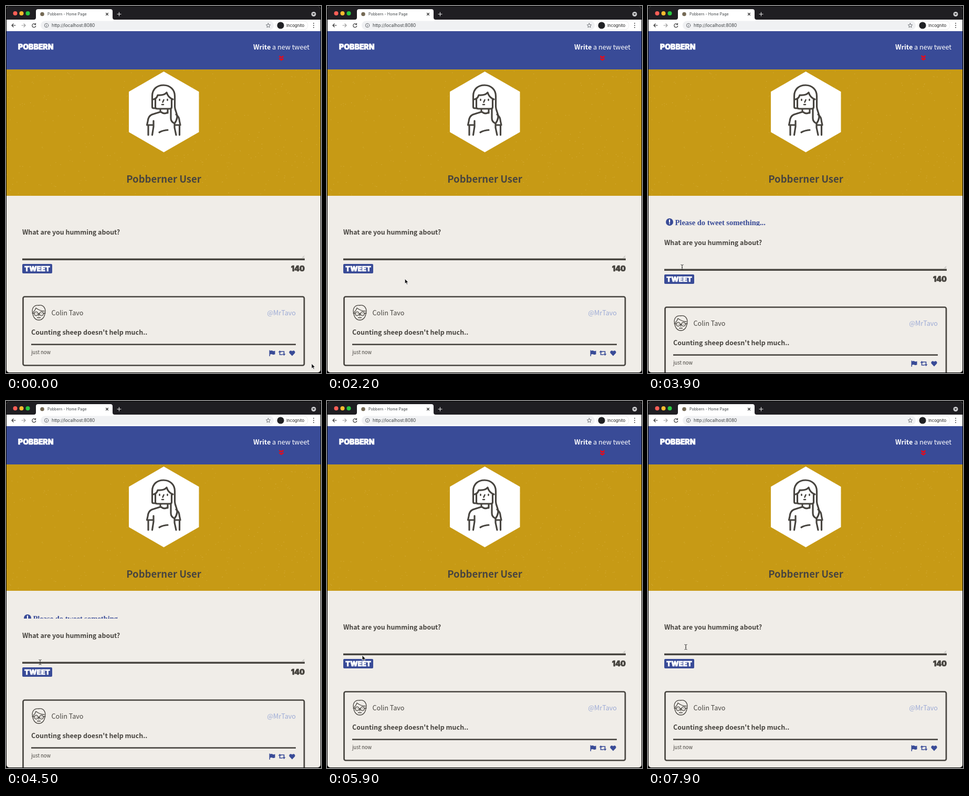
Write an HTML page that moves like this. It is 600 by 700 pixels and loops after 8 s.

```html
<!DOCTYPE html>
<html lang="en">
<head>
<meta charset="utf-8">
<title>Pobbern - Home Page</title>
<style>
html, body { margin: 0; width: 100%; height: 100%; overflow: hidden; background: #000; }
svg { display: block; width: 600px; height: 700px; }
text { font: 300 12.6px "Noto Sans CJK JP", "Noto Sans CJK SC", "Noto Sans", sans-serif; fill: #47443f; white-space: pre; }
.bold { font-weight: 700; }
.end { text-anchor: end; }
.ui { font: 400 7.1px Inter, Roboto, sans-serif; fill: #3c4043; }
.block { font: 900 14px Inter, Roboto, sans-serif; stroke-width: .7; }
.light { fill: #fff; }
.blue { fill: #394b97; }
.ink { fill: none; stroke: #47443f; stroke-linecap: round; stroke-linejoin: round; }
.icon { fill: none; stroke: #5f6368; stroke-width: 1.2; stroke-linecap: round; stroke-linejoin: round; }
</style>
</head>
<body>
<svg viewBox="0 0 600 700">
<defs>
  <clipPath id="window"><rect x="1" y="1" width="598" height="698" rx="5"/></clipPath>
  <clipPath id="reveal"><rect id="revealBox" x="28" y="380" width="300" height="0"/></clipPath>
</defs>
<g clip-path="url(#window)">
  <rect width="600" height="700" fill="#f0ede8"/>

  <!-- browser bar -->
  <rect width="600" height="27" fill="#1f1e22"/>
  <circle cx="17.5" cy="14" r="4" fill="#ff5f57"/>
  <circle cx="29.5" cy="14" r="4" fill="#febc2e"/>
  <circle cx="41.5" cy="14" r="4" fill="#28c840"/>
  <path d="M53 26Q57 26 57 22V10Q57 6 61 6H199Q203 6 203 10V22Q203 26 207 26V27H53Z" fill="#fff"/>
  <rect y="26" width="600" height="22" fill="#fff"/>
  <circle cx="69" cy="15.5" r="3.8" fill="#756a55"/>
  <text class="ui" x="79" y="18">Pobbern - Home Page</text>
  <path class="icon" d="M190.5 13.5l4 4m0-4l-4 4" style="stroke:#333"/>
  <path class="icon" d="M212 15.5h7m-3.500-3.500v7" style="stroke:#ddd"/>
  <circle cx="586" cy="15.500" r="4.500" fill="#c9c9cc"/>
  <path d="M583.500 14.300h5l-2.500 3z" fill="#222"/>
  <path class="icon" d="M18 37h-7m3-3l-3 3 3 3" style="stroke:#333"/>
  <path class="icon" d="M30 37h7m-3-3l3 3-3 3" style="stroke:#999"/>
  <path class="icon" d="M56 35a3.500 3.500 0 1 0 .7 3M56.500 33v2.500h-2.500" style="stroke:#444"/>
  <rect x="66" y="28.500" width="444" height="17" rx="8.500" fill="#f0f1f3"/>
  <circle class="icon" cx="77" cy="37" r="3.700" style="stroke-width:.9"/>
  <path class="icon" d="M77 36.800v2M77 35v.01" style="stroke-width:1"/>
  <text class="ui" x="87" y="40" style="font-size:8.3px">http://localhost:8080</text>
  <path class="icon" d="M499.500 33l1.200 2.700 2.900.3-2.200 2 .6 2.900-2.500-1.500-2.500 1.500.6-2.900-2.200-2 2.900-.3z" style="stroke-width:.9"/>
  <rect x="514" y="28.500" width="61" height="17" rx="8.500" fill="#fff" stroke="#e6e6e8" stroke-width=".8"/>
  <circle cx="523" cy="37" r="6.600" fill="#202124"/>
  <text class="ui" x="534" y="40" style="font-size:7.8px;fill:#222">Incognito</text>
  <path d="M586 33v.01m0 4v.01m0 4v.01" stroke="#444" stroke-width="1.900" stroke-linecap="round"/>

  <!-- header and banner -->
  <rect y="48" width="600" height="73" class="blue"/>
  <text class="block light" x="23" y="83" stroke="#fff">POBBERN</text>
  <text class="end light" x="578" y="83"><tspan class="bold">Write</tspan> a new tweet</text>
  <path id="arrow" d="M520.500 -3.700l4 3 4-3M520.500 1l4 3 4-3" fill="none" stroke="#f40612" stroke-width="2.300"/>
  <rect y="121" width="600" height="241" fill="#c79a15"/>
  <path id="specks" stroke="#e0bb55" stroke-width="1.100" stroke-linecap="round" opacity=".5"/>
  <path d="M300.500 125L367.500 163.500V240.500L300.500 279L234 240.500V163.500Z" fill="#fff"/>
  <g class="ink" stroke-width="3.200">
    <path d="M284 195H281Q278.500 195 278.500 192V172C278.500 158 288 151 300 151S321.500 159 321.500 172V192C322 201 326 203 326 212Q325 219 321 224Q314 221 314 214V197"/>
    <path d="M284.500 178V193Q284.500 196 288 196H312Q315.500 196 315.500 193V178"/>
    <path d="M281 178Q287 177 289 170Q301 171 306 165Q309 175 318 178"/>
    <path d="M294 197V202Q284 205 278 207Q271 210 270 220L268.500 227H280M308 197V204M295 202Q301 207 308 203"/>
    <path d="M324 207Q330 211 330.500 220L332 227H322M281 219V230L278.500 246M271 228V246M321 225V232L324 246M330.500 228V246"/>
    <path d="M292 241Q299 237 308 236.500"/>
    <path d="M292.500 178v2M307.500 178v2M300.500 179L298.500 183.500M297 188h3" stroke-width="2.600"/>
  </g>
  <text class="bold" x="300.500" y="336.500" text-anchor="middle" style="font-size:18.5px">Pobberner User</text>

  <!-- validation message -->
  <g clip-path="url(#reveal)">
    <g id="message">
      <circle class="blue" cx="41" cy="-6" r="7"/>
      <path d="M41 -10v4.500m0 2.800v.01" stroke="#fff" stroke-width="2.200" stroke-linecap="round"/>
      <text class="blue" x="51.500" style="font:700 14.5px 'Liberation Serif', serif">Please do tweet something...</text>
    </g>
  </g>

  <!-- form and post, pushed down together -->
  <g id="content">
    <text class="bold" x="31" y="436" style="font-size:12.4px">What are you humming about?</text>
    <path d="M564 480.500l4-4m-1.500 4l1.500-1.500" stroke="#888" stroke-width=".7"/>
    <rect x="31" y="481.500" width="538" height="3.500" fill="#47443f"/>
    <rect id="button" class="blue" x="31" y="492" width="57" height="18" rx="2"/>
    <text class="block light" x="59.500" y="506" text-anchor="middle" stroke="#fff" style="font-size:13.3px">TWEET</text>
    <text class="block end" x="569" y="505.500" stroke="#47443f">140</text>

    <rect id="shadow" x="36.500" y="558" width="537" height="132.500" rx="4" fill="#9dabd6"/>
    <rect x="32.500" y="554.500" width="535.500" height="131" rx="3" fill="#f0ede8" stroke="#47443f" stroke-width="2.700"/>
    <g class="ink" stroke-width="1.300">
      <path d="M51 587C48 577 53 570 62 571C71 569 77 577 74 587C73 595 68 599 62.500 599S52 595 51 587Z"/>
      <path d="M52 584Q56 580 57 576Q65 582 73 582"/>
      <circle cx="57.500" cy="587" r="3.600"/><circle cx="67.500" cy="587" r="3.600"/>
      <path d="M61 587h3M50 586l4 0M71 586h4M62.500 588v3M59.500 594.500h6M57.500 587v.01M67.500 587v.01"/>
    </g>
    <text x="86.500" y="589.500">Colin Tavo</text>
    <text class="end" x="552" y="589.500" style="fill:#9dabd6">@MrTavo</text>
    <text class="bold" x="48" y="627" style="font-size:12.5px">Counting sheep doesn't help much..</text>
    <rect x="48" y="644.300" width="504" height="2.600" fill="#47443f"/>
    <text x="48" y="664" style="font-size:9.4px">just now</text>
    <path class="blue" d="M501.500 656.500h1.500v1.200q3-1.200 5 0t4.500-.2v6.800q-3 1.300-5 .2t-4.500.2v3.300h-1.500z"/>
    <path d="M521.500 659.500v5.500h5.500M523 659h6.500v5.500" fill="none" stroke="#394b97" stroke-width="1.700"/>
    <path class="blue" d="M518.500 660.500l3-3.500 3 3.500zM526.500 663.500h6l-3 3.500z"/>
    <path class="blue" d="M545 667.500l-4.800-5c-2.500-3 1.500-7.500 4.800-4c3.300-3.500 7.300 1 4.800 4z"/>
  </g>

  <path id="pointer" d="M0 0V9.500L2.200 7.600 3.800 11 5.400 10.300 3.900 7H6.800Z" fill="#111" stroke="#fff" stroke-width=".8"/>
  <path id="beam" d="M-2.500 -4.500Q0 -4.500 0 -3V3.500Q0 5 -2.500 5M2.500 -4.500Q0 -4.500 0 -3M0 3.500Q0 5 2.500 5M-1 .500h2" fill="none" stroke="#333" stroke-width="1"/>
</g>
</svg>
<script>
const LOOP = 8000, STEP = 100;
const $ = id => document.getElementById(id);

// Keys hold a time followed by the values at that time.
const cursorKeys = [
  [0, 582, 682], [300, 580, 681], [1200, 473, 644], [1700, 300, 553], [2500, 78, 505],
  [2800, 65, 498], [5400, 65, 498], [5500, 65, 490], [5900, 67, 485], [6400, 72, 469], [8000, 72, 469]
];
const pushKeys = [
  [0, 0], [3350, 0], [3600, 16], [3900, 20], [4150, 22], [4300, 22],
  [4500, 16], [5450, 15], [5800, 0], [8000, 0]
];

function sample(keys, t) {
  const i = keys.findIndex(key => key[0] > t);
  const a = keys[i - 1], b = keys[i];
  const p = (t - a[0]) / (b[0] - a[0]);
  const eased = p * p * (3 - 2 * p);
  return a.slice(1).map((v, k) => v + (b[k + 1] - v) * eased);
}

function move(id, x, y) {
  $(id).setAttribute("transform", `translate(${x} ${y})`);
}

function scatterSpecks(count) {
  let seed = 7, d = "";
  const random = () => (seed = (seed * 16807) % 2147483647) / 2147483647;
  for (let i = 0; i < count; i++) {
    d += `M${(random() * 600).toFixed(1)} ${(122 + random() * 239).toFixed(1)}h${(random() * .8).toFixed(1)}`;
  }
  $("specks").setAttribute("d", d);
}

function draw(t) {
  const [x, y] = sample(cursorKeys, t);
  const [push] = sample(pushKeys, t);
  const localY = y - push;
  const over = (left, top, right, bottom) =>
    x > left && x < right && localY > top && localY < bottom;

  move("arrow", 0, 98.3 + Math.cos((t - 120) * Math.PI / 500));
  move("content", 0, push);
  move("message", 0, 428 - push / 2);
  $("revealBox").setAttribute("height", 19 + push);

  const typing = over(31, 448, 569, 484);
  move("pointer", x, y);
  move("beam", x, y);
  $("pointer").style.display = typing ? "none" : "";
  $("beam").style.display = typing ? "" : "none";
  $("button").style.fill = over(31, 492, 88, 510) ? "#fe0000" : "";
  $("shadow").style.display = over(31, 553, 569, 687) ? "" : "none";
}

const start = performance.now();
function tick() {
  const t = (performance.now() - start) % LOOP;
  draw(Math.floor(t / STEP) * STEP);
  requestAnimationFrame(tick);
}

scatterSpecks(420);
tick();
</script>
</body>
</html>
```
